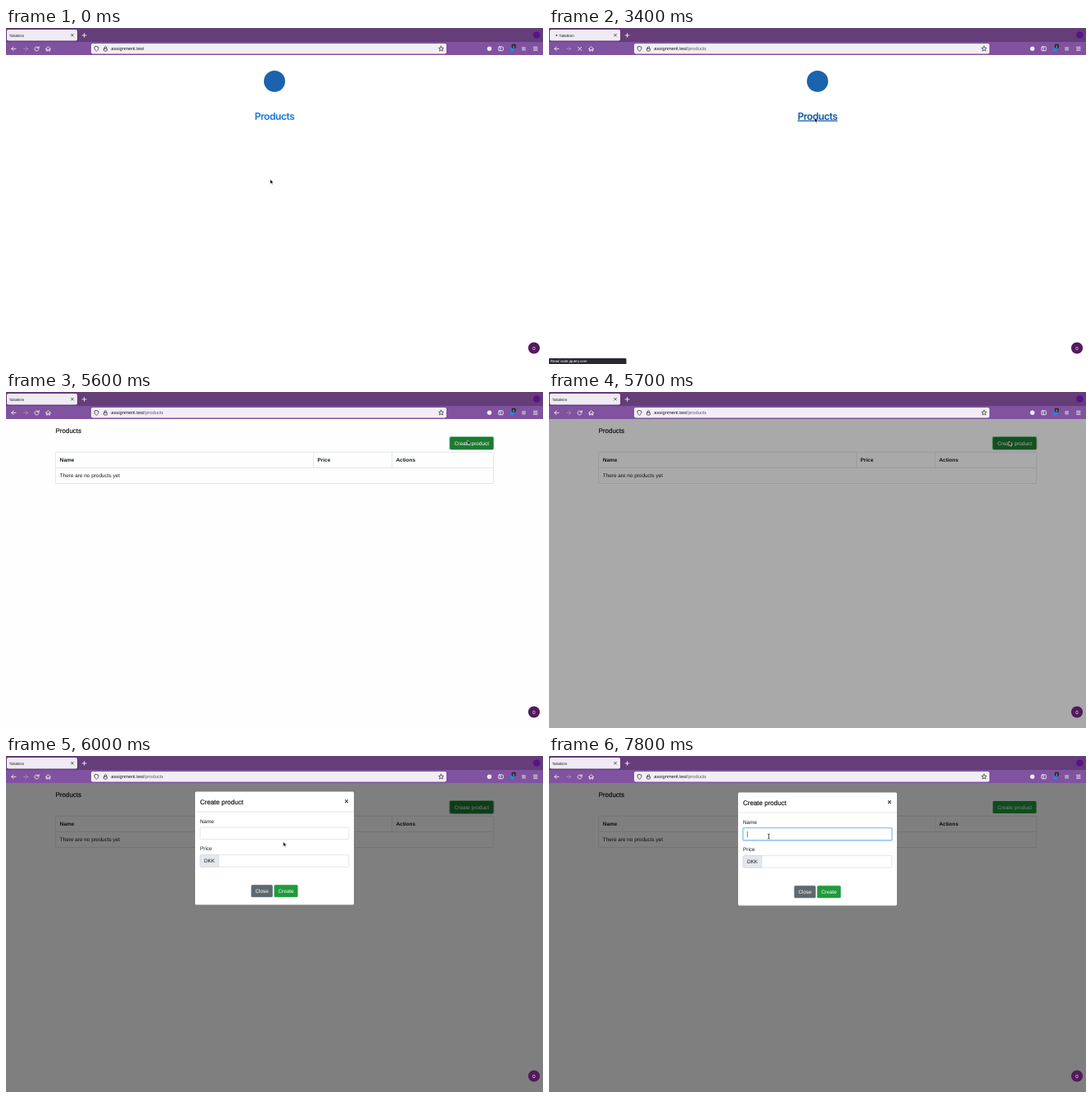
An HTML page that plays this animation: 656 by 410 pixels, repeating every 8 s.

```html
<!DOCTYPE html>
<html lang="en">
<head>
<meta charset="utf-8">
<title>TalloBrim</title>
<style>
html, body { margin: 0; width: 100%; height: 100%; overflow: hidden; background: #fff }
svg { display: block; width: 656px; height: 410px; font: 6.4px "Liberation Sans", Arial, sans-serif; text-rendering: geometricPrecision }
text { fill: #17191c; white-space: pre }
.mid { font-size: 8px; stroke: #17191c; stroke-width: .2px }
.bold { font-weight: 700 }
.white { fill: #fff }
.center { text-anchor: middle }
.icon { fill: none; stroke: #f4eef8; stroke-width: .9; stroke-linecap: round; stroke-linejoin: round }
.dark { stroke: #3c3742; stroke-width: .8 }
.rule { fill: none; stroke: #dee2e6; stroke-width: .8 }
.field { fill: #fff; stroke: #ced4da; stroke-width: .6 }
#link { font: 600 12px Inter, "Open Sans", sans-serif; letter-spacing: -.035em }
</style>
</head>
<body>
<svg viewBox="0 0 656 410">
  <rect width="656" height="410" fill="#fff"/>

  <g id="home">
    <circle cx="328" cy="65" r="13" fill="#1b63ae"/>
    <text id="link" class="center" x="328" y="111.7">Products</text>
  </g>

  <g id="list">
    <text class="mid" x="60.5" y="50.2">Products</text>
    <rect id="ring" x="541.3" y="54.1" width="55" height="16.8" rx="2.4" fill="#48b461"/>
    <rect id="add" x="542.2" y="55" width="53.2" height="15" rx="1.5"/>
    <text class="white center" x="568.8" y="64.9">Create product</text>
    <path class="rule" d="M60.6 73.3H595.4V111.5H60.6ZM60.6 92.5H595.4M375.6 73V92.5M471.6 73V92.5"/>
    <g class="bold">
      <text x="65.8" y="85.3">Name</text>
      <text x="380.6" y="85.3">Price</text>
      <text x="476.5" y="85.3">Actions</text>
    </g>
    <text x="65.8" y="104.4">There are no products yet</text>
  </g>

  <rect id="shade" y="33" width="656" height="377"/>

  <g id="modal">
    <rect x="231" y="44.4" width="194" height="138" rx="1.6" fill="#fff"/>
    <text class="mid" x="237" y="59.7">Create product</text>
    <path d="M414.2 54.4L417.8 58M417.8 54.4L414.2 58" stroke="#444" stroke-width="1.1"/>
    <path class="rule" d="M231 69H425" stroke-width=".5"/>
    <text x="237" y="82.5">Name</text>
    <rect id="glow" x="235.9" y="86.7" width="184.2" height="17.2" rx="2.6" fill="#007bff"/>
    <rect id="name" class="field" x="237.2" y="88" width="181.6" height="14.6" rx="1.5"/>
    <path id="caret" d="M242.4 92V99" stroke="#222" stroke-width=".6"/>
    <text x="237" y="116">Price</text>
    <rect class="field" x="237.2" y="121.6" width="181.6" height="14.6" rx="1.5"/>
    <path d="M260 121.6H238.7a1.5 1.5 0 0 0-1.5 1.5V134.700a1.500 1.500 0 0 0 1.500 1.500H260Z" style="fill:#e4e8ec" class="field"/>
    <text class="center" x="248.500" y="131.300">DKK</text>
    <rect x="299.500" y="158.200" width="26.300" height="15" rx="1.500" fill="#5f676f"/>
    <text class="white center" x="312.600" y="168">Close</text>
    <rect x="327.500" y="158.200" width="29" height="15" rx="1.500" fill="#209a3c"/>
    <text class="white center" x="342" y="168">Create</text>
  </g>

  <circle cx="645" cy="390.500" r="7.100" fill="#521a5c"/>
  <text class="white center" x="645" y="392.600" font-size="6">0</text>

  <g id="status">
    <path d="M0 403H93a1.500 1.500 0 0 1 1.500 1.500V410H0Z" fill="#2b2730"/>
    <text class="white" x="1.800" y="408.300" font-size="4.500">Read code.jquery.com</text>
  </g>

  <rect width="656" height="17.500" fill="#643d79"/>
  <rect y="17" width="656" height="16" fill="#80529f"/>
  <rect x="1" y="2" width="86" height="13.500" rx="1.800" fill="#f0eaf4"/>
  <circle id="dot" cy="9" r=".9" fill="#3c3742"/>
  <text id="tab" y="10.600" font-size="4.500">TalloBrim</text>
  <path class="icon dark" d="M79.600 7.300L82.400 10.100M82.400 7.300L79.600 10.100"/>
  <path class="icon" d="M93.200 8.900H98M95.600 6.500V11.300"/>
  <circle cx="648.300" cy="8.500" r="4.300" fill="#5a128c"/>

  <g class="icon">
    <path d="M12 25.300H6.800M9.200 22.900L6.800 25.300L9.200 27.700"/>
    <path d="M21.400 25.300H26.600M24.200 22.900L26.600 25.300L24.200 27.700" opacity=".35"/>
    <path id="reload" d="M39.700 24.200A2.500 2.500 0 1 0 40 26M40.200 22.700V24.600H38.300"/>
    <path id="stop" d="M35.500 23.200L39.700 27.400M39.700 23.200L35.500 27.400"/>
    <path d="M48.600 25.400L51.500 22.700L54.400 25.400M49.300 25V28H50.700V26.300H52.300V28H53.700V25"/>
    <rect x="601.700" y="22.900" width="5.600" height="4.800" rx=".8"/>
    <path d="M604 23V27.600M644.500 23.300H649M644.500 25.300H649M644.500 27.300H649"/>
  </g>
  <circle cx="590.500" cy="25.300" r="2.700" fill="#f4eef8"/>
  <circle cx="618.500" cy="26" r="2.800" fill="#2a84d8"/>
  <rect x="617.800" y="19.800" width="5" height="4.800" rx=".8" fill="#29242f"/>
  <text class="white center" x="620.300" y="23.500" font-size="3.600">0</text>
  <rect x="630.200" y="23" width="4.600" height="4.600" fill="#a9a6b8"/>

  <rect x="104" y="19" width="434" height="12.400" rx="1.800" fill="#f3eef6"/>
  <g class="icon dark">
    <path d="M110.500 22.500L113 23.400C113 25.800 112.400 27.300 110.500 28.400C108.600 27.300 108 25.800 108 23.400Z"/>
    <rect x="119.500" y="25" width="4" height="3" rx=".5"/>
    <path d="M120.300 25V23.900A1.200 1.200 0 0 1 122.700 23.900V25"/>
    <path d="M531.500 22.200L532.400 24.200L534.500 24.400L532.900 25.800L533.400 28L531.500 26.800L529.600 28L530.100 25.800L528.500 24.400L530.600 24.200Z"/>
  </g>
  <text x="128.300" y="27.200" font-size="5.750">assignment.test<tspan id="path" fill="#5b5661">/products</tspan></text>

  <g id="cursor">
    <path id="arrow" d="M0 0V5.600L1.300 4.500L2.200 6.500L3.100 6.100L2.200 4.100H4Z" fill="#000" stroke="#fff" stroke-width=".5"/>
    <path id="beam" d="M-1.300 -3Q0 -3 0 -2.200Q0 -3 1.300 -3M0 -2.200V2.200M-1.300 3Q0 3 0 2.200Q0 3 1.300 3" fill="none" stroke="#111" stroke-width=".7"/>
  </g>
</svg>
<script>
const LOOP = 8000;
const el = id => document.getElementById(id);
const set = (id, name, value) => el(id).setAttribute(name, value);
const show = (id, on) => set(id, "visibility", on ? "visible" : "hidden");
const ramp = (t, start, length) => Math.min(1, Math.max(0, (t - start) / length));
const mix = (a, b, p) => `rgb(${a.map((v, i) => Math.round(v + (b[i] - v) * p))})`;

// Pointer stops: time, x, y
const route = [
  [0, 322.8, 184.6], [500, 322.8, 184.6], [800, 323.3, 183.8], [1850, 323.3, 183.8],
  [2100, 324, 172], [2400, 323, 140], [2700, 324.6, 109.5], [4250, 324.6, 109.5],
  [4400, 335, 114], [4500, 383, 120], [4600, 458, 118], [4750, 530, 95],
  [5000, 564.8, 59], [5300, 564.8, 59], [5400, 564, 58.8], [5600, 564, 58.8],
  [5700, 562.7, 59.8], [5850, 450, 90], [6000, 339, 104.7], [6200, 290, 101], [6400, 268.5, 98]
];

function pointer(t) {
  const next = route.findIndex(k => k[0] > t);
  if (next < 0) return route[route.length - 1].slice(1);
  const [t0, x0, y0] = route[next - 1], [t1, x1, y1] = route[next];
  const p = (t - t0) / (t1 - t0);
  return [x0 + (x1 - x0) * p, y0 + (y1 - y0) * p];
}

function draw(t) {
  const loading = t >= 2800 && t < 3700;
  const hover = t >= 2650;
  const listed = t >= 3500;

  show("home", !listed);
  show("list", listed);
  el("link").style.fill = hover ? "#0c55a6" : "#1275dc";
  set("link", "text-decoration", hover ? "underline" : "none");

  show("dot", loading);
  set("dot", "cx", 7 + 2.2 * Math.cos((t - 3400) / 130));
  set("tab", "x", loading ? 12.2 : 3.8);
  show("stop", loading);
  show("reload", !loading);
  set("reload", "opacity", t >= 3700 && t < 4100 ? 0.4 : 1);
  show("path", t >= 3000);
  show("status", t >= 3200 && t < 3600);

  const blur = ramp(t, 6050, 150);
  set("add", "fill", mix([32, 154, 60], [28, 122, 50], ramp(t, 4900, 150) - blur));
  set("ring", "opacity", 0.6 * (ramp(t, 5300, 150) - blur));

  set("shade", "opacity", 0.5 * ramp(t, 5600, 150));
  const slide = (1 - ramp(t, 5750, 300)) ** 1.7;
  set("modal", "opacity", ramp(t, 5750, 150));
  set("modal", "transform", `translate(0 ${-20 * slide})`);

  const focus = ramp(t, 6450, 150);
  set("glow", "opacity", 0.3 * focus);
  el("name").style.stroke = mix([206, 212, 218], [110, 175, 240], focus);
  show("caret", t >= 6500 && (t < 7300 || t >= 7800));

  set("cursor", "transform", `translate(${pointer(t)})`);
  show("arrow", t < 6200);
  show("beam", t >= 6200);
}

function tick() {
  draw(performance.now() % LOOP);
  requestAnimationFrame(tick);
}
tick();
</script>
</body>
</html>
```
